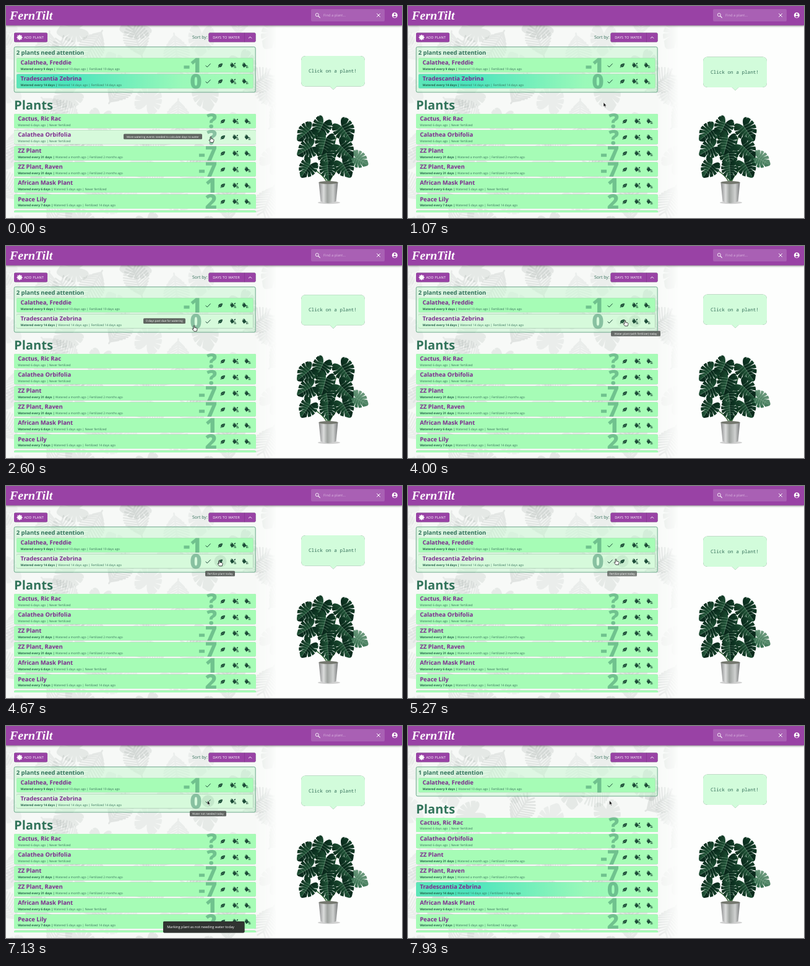
An HTML page for the animation above (8 s loop, 640 px wide and 344 px high).

```html
<!DOCTYPE html>
<html lang="en">
<head>
<meta charset="utf-8">
<title>Plant care</title>
<style>
  html, body { margin: 0; width: 100%; height: 100%; overflow: hidden; background: #fdfefd; }
  svg { display: block; width: 100vw; height: 100vh; }
  text { font-family: "Open Sans", sans-serif; text-rendering: geometricPrecision; white-space: pre; }
  .h { font-weight: 700; fill: #32745b; }
  .name { font-weight: 700; font-size: 9.45px; fill: #7d2a8f; }
  .sub { font-size: 4.95px; fill: #35705a; }
  .sub tspan { font-weight: 700; fill: #23604a; }
  .num { font-weight: 800; font-size: 33px; fill: #3c8a68; opacity: .5; text-anchor: end; }
  .btn { font-size: 5.6px; font-weight: 500; letter-spacing: .17px; fill: #fff; }
  .tip { font-size: 4.5px; fill: #fff; text-anchor: middle; }
  .paper { filter: drop-shadow(0 .9px .6px rgba(0, 30, 15, .6)); }
  .bar { filter: drop-shadow(0 1px 1.5px rgba(0, 0, 0, .5)); }
  .ink { fill: #1d4b38; }
  .line { fill: none; stroke-linecap: round; stroke-linejoin: round; }
</style>
</head>
<body>
<svg id="stage" viewBox="0 0 640 344" preserveAspectRatio="none"></svg>
<script>
const LOOP = 8000, PITCH = 26.1, CLICK = 6600, MOVED = 7870;
const stage = document.getElementById('stage');
const clamp = v => Math.max(0, Math.min(1, v));
const smooth = v => v * v * (3 - 2 * v);
const ramp = (t, a, b) => smooth(clamp((t - a) / (b - a)));

let seed = 11;
const rnd = () => (seed = (seed * 16807) % 2147483647) / 2147483647;

const rect = (x, y, w, h, r, fill, more = '') =>
  `<rect x="${x}" y="${y}" width="${w}" height="${h}" rx="${r}" fill="${fill}" ${more}/>`;
const text = (cls, x, y, s, more = '') => `<text class="${cls}" x="${x}" y="${y}" ${more}>${s}</text>`;
const at = (x, y, s, rot = 0, k = 1) => `<g transform="translate(${x} ${y}) rotate(${rot}) scale(${k})">${s}</g>`;

// Split leaf of unit size, tip pointing down
function splitLeaf() {
  const pts = [];
  for (let i = 0; i < 180; i++) {
    const a = -Math.PI + i * Math.PI / 90, b = Math.abs(a);
    let r = 1.02 - .16 * Math.sin(a) ** 2 + .22 * Math.exp(-((b / .25) ** 2));
    r *= 1 - .75 * Math.exp(-(((Math.PI - b) / .35) ** 2));
    if (b > .3 && b < 2.4) r *= 1 - .55 * Math.max(0, Math.cos(a * 13)) ** 9;
    pts.push((r * Math.sin(a)).toFixed(3) + ' ' + (r * Math.cos(a)).toFixed(3));
  }
  return 'M' + pts.join('L') + 'Z';
}
function veins() {
  let d = 'M0 -.3L0 1.1';
  for (let i = 0; i < 5; i++) {
    const y = -.25 + i * .22, w = .72 - i * .1;
    d += `M${-w} ${y + .1}L0 ${y}L${w} ${y + .1}`;
  }
  return d;
}
function frond() {
  let d = 'M0 0L0 -40';
  for (let i = 0; i < 11; i++) {
    const y = -3 - i * 3.5, w = 17 * Math.sin(.5 + i * .23);
    d += `M0 ${y}L${w} ${y - 8}M0 ${y}L${-w} ${y - 8}`;
  }
  return d;
}
const LEAF = splitLeaf(), VEINS = veins(), FROND = frond();

function wallpaper() {
  let s = rect(0, 31, 440, 313, 0, '#f7f9f7');
  for (let j = 0; j < 7; j++) for (let i = 0; i < 9; i++) {
    const x = i * 52 - 4 + rnd() * 26, y = 30 + j * 52 + rnd() * 26, rot = rnd() * 360;
    const o = (.05 + rnd() * .09).toFixed(2);
    s += (i + j) % 2
      ? at(x, y, `<path class="line" d="${FROND}" stroke="#5c6a62" stroke-width="2.2" opacity="${o}"/>`, rot, 1.2)
      : at(x, y, `<path d="${LEAF}" fill="#5c6a62" opacity="${o}"/>`, rot, 25);
  }
  return `<g mask="url(#left)">${s}</g>`;
}

function monstera() {
  // x, y, size, turn
  const leaves = [
    [568, 248, 16, -60], [511, 194, 18, 25], [545, 199, 20, -35], [488, 204, 18, 50],
    [544, 230, 19, -45], [490, 231, 18, 60], [518, 240, 18, -10], [516, 219, 19, 15],
    [546, 259, 18, -30], [489, 261, 17, 35], [520, 263, 16, -5]];
  let stems = '', blades = '';
  leaves.forEach(([x, y, s, rot], i) => {
    stems += `M521 292Q${521 + (x - 521) * .15} ${y + 12} ${x} ${y}`;
    blades += at(x, y, `<path d="${LEAF}" fill="url(#${i ? 'blade' : 'pale'})"/>` +
      `<path class="line" d="${VEINS}" stroke="#a5c9ae" stroke-width=".035" opacity=".55"/>`, rot, s);
  });
  return `<ellipse cx="522" cy="319" rx="18" ry="2.200" fill="#000" opacity=".18"/>
    <path class="line" d="${stems}" stroke="#3c6a3d" stroke-width="1.6"/>
    <path d="M505.500 286H536.500L533.500 317Q521 323 508.500 317Z" fill="url(#pot)"/>
    <ellipse cx="521" cy="286.500" rx="15.500" ry="2.400" fill="#75786f"/>${blades}`;
}

const icons = {
  check: '<path class="line" d="M-3.600 .3L-1.300 2.600L3.800 -2.700" stroke="#1d4b38" stroke-width="1"/>',
  leaf: '<path class="ink" d="M3.600 -3.300C-1 -3.300 -4 -1.500 -3.100 1.700L-3.900 3.500L-3.100 3.800L-2.400 2.500C1.700 3.700 3.100 .4 3.600 -3.300Z"/>' +
    '<path class="line" d="M-2.800 2.300Q-1.200 -.1 1.500 -1.200" stroke="#a6fcb6" stroke-width=".35"/>',
  can: '<path class="ink" d="M-4.500 -.8L-.6 -4L2.300 -.2L4.700 .3L4.400 1.200L2 1L-1.600 3.500Z"/>' +
    '<path class="line" d="M-3 -2C-4.300 -4.600 -.6 -5 0 -3.200" stroke="#1d4b38" stroke-width=".8"/>' +
    '<path class="line" d="M2.500 3.700V2.300M3.700 3.700V2.300M4.900 3.700V2.300" stroke="#1d4b38" stroke-width=".8"/>',
};
icons.feed = icons.can + '<path class="ink" d="M2 -1.500Q1.800 -4 4.500 -4.300Q4.500 -1.600 2 -1.500Z"/>';

const days = n => `<tspan>Watered every ${n} days |</tspan> `;
// name, details, number
const plants = {
  freddie: ['Calathea, Freddie', days(9) + 'Watered 10 days ago | Fertilized 19 days ago', '-1'],
  zebrina: ['Tradescantia Zebrina', days(14) + 'Watered 14 days ago | Fertilized 14 days ago', '0'],
  cactus: ['Cactus, Ric Rac', 'Watered 6 days ago | Never fertilized', '?'],
  orbifolia: ['Calathea Orbifolia', 'Watered 6 days ago | Never fertilized', '?'],
  zz: ['ZZ Plant', days(31) + 'Watered a month ago | Fertilized 2 months ago', '-7'],
  raven: ['ZZ Plant, Raven', days(31) + 'Watered a month ago | Fertilized 2 months ago', '-7'],
  mask: ['African Mask Plant', days(6) + 'Watered 5 days ago | Never fertilized', '1'],
  lily: ['Peace Lily', days(7) + 'Watered 5 days ago | Fertilized 14 days ago', '2'],
  next: ['', '', ''],
};

function row(id, urgent) {
  const [name, info, num] = plants[id];
  const x = urgent ? 17 : 13, w = urgent ? 382.5 : 391, tx = urgent ? 23.5 : 19.2;
  const ix = urgent ? 346.5 : 350.5;
  return rect(x, 0, w, 23, 2, '#d6fadb', 'class="paper"') +
    rect(x, 0, w, 23, 2, id === 'zebrina' ? 'url(#due)' : '#a6fcb6', 'class="tint"') +
    text('num', urgent ? 316.5 : 341, 23.2, num) +
    text('name', tx, 10.9, name) + text('sub', tx, 19.4, info) +
    (urgent ? at(326.5, 12, icons.check) : '') +
    at(ix, 12, icons.leaf) + at(ix + 20, 12, icons.feed) + at(ix + 39.5, 12, icons.can);
}
const rowTag = (id, urgent) => `<g id="${id}${urgent ? '-due' : ''}">${row(id, urgent)}</g>`;

// text, center x, top, width, hit box: x0, y0, x1, y1
const tips = [
  ['More watering events needed to calculate days to water', 253.5, 207.5, 127, 321, 201, 341, 225],
  ['0 days past due for watering', 256, 117.3, 68, 294, 110, 316, 134],
  ['Water plant (with fertilizer) today', 368, 137.7, 80, 356.5, 110, 376, 134],
  ['Fertilize plant today', 346, 137.7, 48, 337, 110, 356.5, 134],
  ['Water not needed today', 326.5, 137.7, 59, 317, 110, 337, 134],
];
const tipTag = ([s, x, y, w]) => `<g class="tipbox">${rect(x - w / 2, y, w, 8.8, 1.6, '#5a5e5b', 'opacity=".95"')}` +
  text('tip', x, y + 6, s) + '</g>';
const glow = x => `<circle class="glow" cx="${x}" cy="122" r="10" fill="#1d4b38"/>`;

stage.innerHTML = `
<defs>
  <linearGradient id="edge" gradientUnits="userSpaceOnUse" x1="402" x2="438"><stop stop-color="#fff"/><stop offset="1"/></linearGradient>
  <mask id="left" maskUnits="userSpaceOnUse" x="0" y="31" width="440" height="313">${rect(0, 31, 440, 313, 0, 'url(#edge)')}</mask>
  <clipPath id="list"><rect y="31" width="433" height="304"/></clipPath>
  <linearGradient id="due"><stop stop-color="#5ce6b8"/><stop offset=".22" stop-color="#4be4bd"/>
    <stop offset=".7" stop-color="#9af9b9"/><stop offset="1" stop-color="#a6fcb6"/></linearGradient>
  <linearGradient id="blade" x1="0" x2="1"><stop stop-color="#0a2a1a"/><stop offset=".49" stop-color="#1f5236"/>
    <stop offset=".51" stop-color="#08261a"/><stop offset="1" stop-color="#123f28"/></linearGradient>
  <linearGradient id="pale" x1="0" x2="1"><stop stop-color="#2f6a49"/><stop offset="1" stop-color="#6f9c80"/></linearGradient>
  <linearGradient id="pot"><stop stop-color="#8a8b8c"/><stop offset=".25" stop-color="#dcdddd"/>
    <stop offset=".45" stop-color="#9fa3a0"/><stop offset=".75" stop-color="#cfd1d0"/><stop offset="1" stop-color="#77797a"/></linearGradient>
</defs>
${rect(0, 0, 640, 344, 0, '#fdfefd')}
${wallpaper()}
${rect(0, 0, 640, 31.4, 0, '#9942a5', 'class="bar"')}
<text x="6" y="21.500" fill="#fff" style="font:italic 700 20px 'Liberation Serif',serif">FernTilt</text>
${rect(493, 5, 119, 20, 2, '#fff', 'opacity=".16"')}
<path class="line" d="M504.800 16.300L507.300 18.800" stroke="#fff" stroke-width="1.100"/>
<circle cx="502.800" cy="14.300" r="2.500" fill="none" stroke="#fff" stroke-width=".9"/>
${text('', 513, 17.2, 'Find a plant...', 'font-size="5.750" fill="#d9b3de"')}
<path class="line" d="M599.500 12.500L604.500 17.500M604.500 12.500L599.500 17.500" stroke="#fff" stroke-width="1"/>
<circle cx="628.300" cy="15" r="4.500" fill="#fff"/>
<circle cx="628.300" cy="13.400" r="1.400" fill="#9942a5"/>
<path d="M625.500 17.500Q628.300 14.600 631.100 17.500Q628.300 20 625.500 17.500Z" fill="#9942a5"/>

${rect(13, 43.5, 54, 15, 2, '#9942a5', 'class="paper"')}
<g fill="#fff">${[0, 45, 90, 135].map(a => at(22, 51, rect(-4.6, -1, 9.2, 2, 1, '#fff'), a)).join('')}
<circle cx="22" cy="51" r="3"/></g>
${text('btn', 29.3, 53.1, 'ADD PLANT')}
${text('', 301, 53.3, 'Sort by:', 'font-size="7" fill="#35705a"')}
${rect(327.5, 43.5, 76, 15, 2, '#9942a5', 'class="paper"')}
<path d="M385.500 43.500V58.500" stroke="#7b3385" stroke-width=".6"/>
${text('btn', 334.2, 53.1, 'DAYS TO WATER')}
<path class="line" d="M392.300 52.200L394.500 50L396.700 52.200" stroke="#fff" stroke-width="1"/>

<g clip-path="url(#list)">
  ${rect(13.2, 66.3, 390, 73.7, 2.5, '#c5f5d0', 'id="panel" fill-opacity=".5" stroke="#5f9f80" stroke-width=".9"')}
  ${text('h', 16.7, 78.6, '', 'id="count" font-size="9.400"')}
  ${text('h', 13, 0, 'Plants', 'id="title" font-size="20.200"')}
  ${rowTag('freddie', true)}${rowTag('zebrina', true)}
  ${Object.keys(plants).slice(1).map(id => rowTag(id)).join('')}
</g>

<g id="bubble">
  <path class="paper" d="M484.500 0H572.500Q580 0 580 7.500V42Q580 49.500 572.500 49.500H534.500L529 54.800L523.500 49.500H484.500Q477 49.500 477 42V7.500Q477 0 484.500 0Z" fill="#d2fcdb"/>
  <text x="489" y="27.200" fill="#35705a" style="font:7.650px 'Noto Sans Mono',monospace">Click on a plant!</text>
</g>
${monstera()}

<g id="snack">${rect(254, 317, 131.5, 18.5, 2, '#303331', 'class="paper"')}
  ${text('', 260.3, 328.2, 'Marking plant as not needing water today', 'font-size="5.600" fill="#fff"')}</g>
${[366.5, 346.5, 326.5].map(glow).join('')}
${tips.map(tipTag).join('')}
<path id="arrow" d="M0 0V7L1.600 5.600L2.700 8L3.800 7.500L2.700 5.200H4.800Z" fill="#111" stroke="#fff" stroke-width=".5"/>
<path id="hand" d="M-.8 .4Q0 -.7 .8 .4V3.400L4.300 4.200Q5.200 4.600 5 6L4.200 9.300H-.2L-2.800 5.900Q-2.900 4.700 -1.600 5.200L-.8 5.900Z" fill="#fff" stroke="#111" stroke-width=".75" stroke-linejoin="round"/>`;

const $ = id => document.getElementById(id);
const put = (el, x, y) => el.setAttribute('transform', `translate(${x.toFixed(2)} ${y.toFixed(2)})`);
const fade = (el, o) => el.setAttribute('opacity', o.toFixed(3));
const tipBoxes = [...stage.querySelectorAll('.tipbox')];
const glows = [...stage.querySelectorAll('.glow')];

// time, x, y of the pointer
const route = [
  [250, 331, 212], [900, 316, 156.5], [1700, 316, 156.5], [2350, 304, 129], [2750, 304, 129],
  [3250, 366, 123], [3800, 366, 123], [4020, 350.5, 120.5], [4200, 345, 120.5], [4900, 345, 120.5],
  [5270, 336, 118.5], [5700, 325.5, 121]];
function pointer(t) {
  const i = route.findIndex(k => k[0] > t);
  if (i < 0) return route[route.length - 1].slice(1);
  if (i === 0) return route[0].slice(1);
  const [t0, x0, y0] = route[i - 1], [t1, x1, y1] = route[i];
  const e = ramp(t, t0, t1);
  return [x0 + (x1 - x0) * e, y0 + (y1 - y0) * e];
}
const inside = ([x, y], [x0, y0, x1, y1]) => x > x0 && x < x1 && y > y0 && y < y1;
// Share of the last span the pointer spent in a box
function dwell(t, box, span) {
  let n = 0;
  for (let i = 0; i < 16; i++) n += inside(pointer(t - i * span / 16), box);
  return n / 16;
}

const listed = Object.keys(plants).slice(2);
function draw(t) {
  const moved = t >= MOVED, p = pointer(t);
  const order = listed.slice();
  if (moved) order.splice(4, 0, 'zebrina');
  const top = 175.2 - (moved ? PITCH : 0);
  let over = false;

  const place = (id, x0, y, x1) => {
    const el = $(id), box = [x0, y, x1, y + 24];
    put(el, 0, y);
    fade(el.querySelector('.tint'), moved ? 1 : 1 - dwell(t, box, 150));
    over = over || inside(p, box);
  };
  place('freddie-due', 17, 84.5, 399);
  place('zebrina-due', 17, 110.6, 399);
  order.forEach((id, i) => place(id, 13, top + i * PITCH, 404));
  $('zebrina-due').style.display = moved ? 'none' : '';
  $('zebrina').style.display = moved ? '' : 'none';
  $('panel').setAttribute('height', moved ? 47.6 : 73.7);
  $('count').textContent = moved ? '1 plant need attention' : '2 plants need attention';
  $('title').setAttribute('y', top - 7.6);

  tips.forEach((tip, i) => {
    const d = moved ? 0 : dwell(t, tip.slice(4), 300);
    fade(tipBoxes[i], clamp(d * 2.2 - .7));
    if (i > 1) fade(glows[i - 2], d * .1);
  });

  put($('bubble'), 0, 80.2 + 2.2 * Math.cos((t - 1000) / 5000 * 2 * Math.PI));
  fade($('snack'), ramp(t, CLICK, CLICK + 220) * (1 - ramp(t, 7720, 7900)));

  const hand = over && t < CLICK;
  put($('hand'), ...p);
  put($('arrow'), ...p);
  $('hand').style.display = hand ? '' : 'none';
  $('arrow').style.display = hand ? 'none' : '';
}

let start;
function tick(now) {
  start ??= now;
  draw((now - start) % LOOP);
  requestAnimationFrame(tick);
}
draw(0);
requestAnimationFrame(tick);
</script>
</body>
</html>
```
